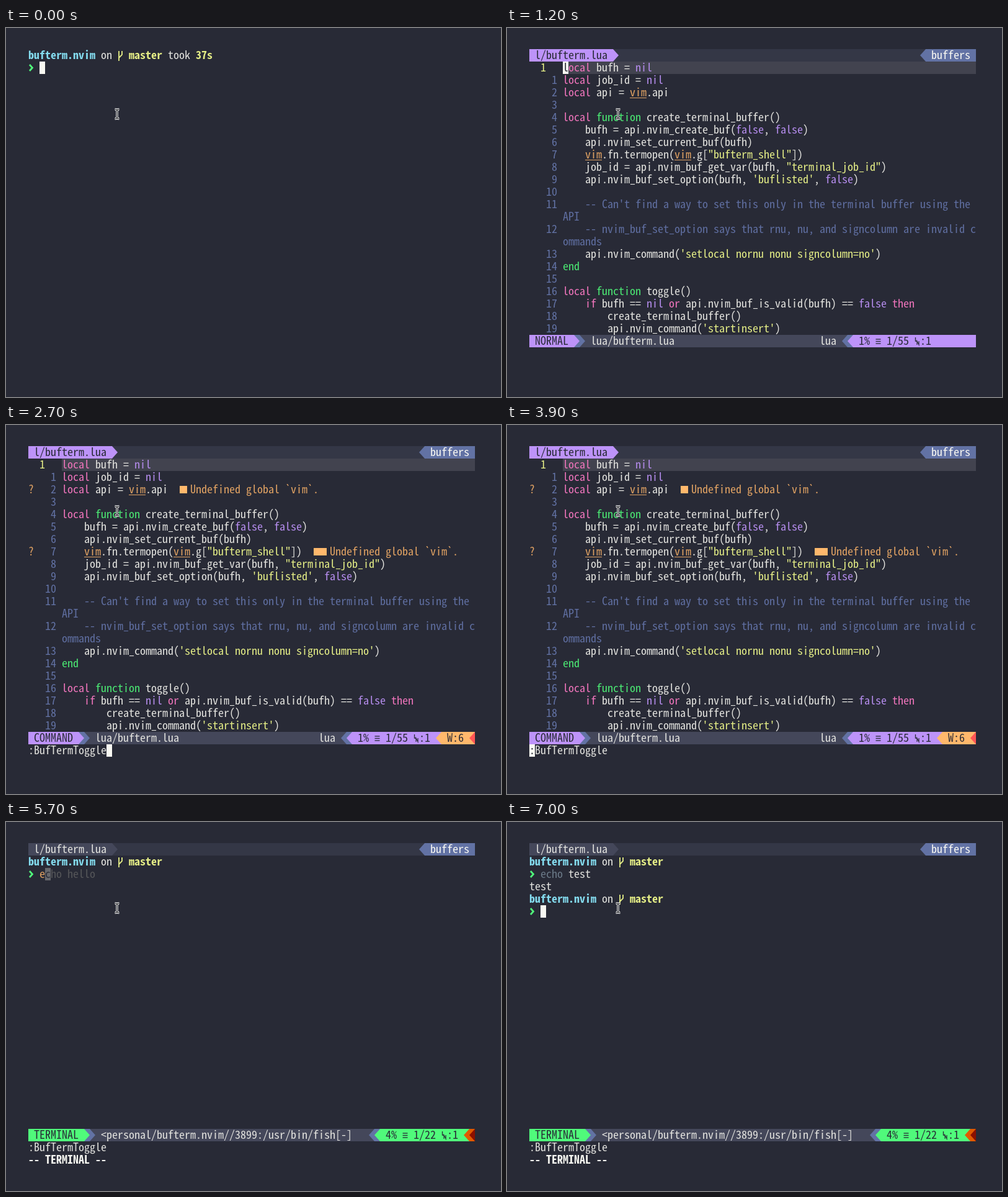
These frames come from a looping animation (798 px wide and 594 px high, 8 s). An HTML page with a canvas:

```html
<!DOCTYPE html>
<html lang="en">
<head>
<meta charset="utf-8">
<title>Terminal buffer demo</title>
<style>
  html, body { margin: 0; width: 100%; height: 100%; overflow: hidden; background: #282a36; }
  canvas { display: block; filter: blur(.45px); }
</style>
</head>
<body>
<canvas id="stage" width="798" height="594"></canvas>
<script>
const ctx = document.getElementById('stage').getContext('2d');
const LOOP = 8000, CELL_W = 9, CELL_H = 20, LEFT = 36, TOP = 34;
const FAMILY = '"Noto Sans Mono CJK JP", "Noto Sans Mono", monospace';
const C = {
  bg: '#282a36', fg: '#e2e2de', white: '#f8f8f2', bar: '#44475a', line: '#42434f', fill: '#343746',
  blue: '#6272a4', comment: '#5f6ea0', purple: '#bd93f9', violet: '#b48cec', pink: '#ee74bb',
  green: '#50fa7b', leaf: '#4be873', yellow: '#e4ed86', cyan: '#84dcef', orange: '#ffb86c',
  warn: '#e0a263', red: '#ff5555', rust: '#e05a00', maroon: '#8b1000', ghost: '#555659'
};

// Pick the font size whose advance fills one cell.
ctx.font = `18px ${FAMILY}`;
const fontSize = 18 * CELL_W / ctx.measureText('M').width;

const x = col => LEFT + col * CELL_W;
const y = row => TOP + row * CELL_H;

function put(col, row, text, color = C.fg, bold = false) {
  ctx.font = `${bold ? 'bold ' : ''}${fontSize}px ${FAMILY}`;
  ctx.fillStyle = color;
  [...text].forEach((ch, i) => ctx.fillText(ch, x(col + i), y(row) + 16));
}

function block(from, to, row, color) {
  ctx.fillStyle = color;
  ctx.fillRect(x(from), y(row), (to - from) * CELL_W, CELL_H);
}

// Powerline separator filling one cell; dir 1 points right, -1 left.
function arrow(col, row, dir, color, back) {
  block(col, col + 1, row, back);
  const base = x(dir > 0 ? col : col + 1);
  ctx.fillStyle = color;
  ctx.beginPath();
  ctx.moveTo(base, y(row));
  ctx.lineTo(base + dir * CELL_W, y(row) + CELL_H / 2);
  ctx.lineTo(base, y(row) + CELL_H);
  ctx.fill();
}

function stroke(points, color, width) {
  ctx.strokeStyle = color;
  ctx.lineWidth = width;
  ctx.beginPath();
  points.forEach(([px, py]) => ctx.lineTo(px, py));
  ctx.stroke();
}

function cursor(col, row, under = '', color = C.white) {
  block(col, col + 1, row, color);
  put(col, row, under, C.bg);
}

function pointer() {
  for (const [color, width] of [['#f4f4f4', 3.4], ['#101116', 1.2]]) {
    stroke([[179, 132], [179, 145]], color, width);
    for (const [edge, inner] of [[131, 132.5], [146, 144.5]]) {
      stroke([[175.5, edge], [177.5, edge], [179, inner], [180.5, edge], [182.5, edge]], color, width);
    }
  }
}

function prompt(row, took) {
  const px = x(16), py = y(row);
  put(0, row, 'bufterm.nvim', C.cyan, true);
  put(13, row, 'on');
  stroke([[px + 2, py + 3], [px + 2, py + 19]], C.yellow, 1.8);
  stroke([[px + 7, py + 3], [px + 7, py + 9], [px + 2, py + 14]], C.yellow, 1.8);
  put(18, row, 'master', C.yellow, true);
  if (took) {
    put(25, row, 'took');
    put(30, row, took, C.yellow, true);
  }
  const chevron = y(row + 1);
  stroke([[38, chevron + 5], [42.5, chevron + 10], [38, chevron + 15]], C.green, 2.7);
}

function typedWithGhost(row, typed, whole, color) {
  put(2, row, typed, color);
  const next = 2 + typed.length;
  put(next, row, whole.slice(typed.length), C.ghost);
  cursor(next, row, whole[typed.length], '#66676c');
}

const CODE = [
  ['', 'local bufh = nil'],
  [1, 'local job_id = nil'],
  [2, 'local api = vim.api'],
  [3, ''],
  [4, 'local function create_terminal_buffer()'],
  [5, '    bufh = api.nvim_create_buf(false, false)'],
  [6, '    api.nvim_set_current_buf(bufh)'],
  [7, '    vim.fn.termopen(vim.g["bufterm_shell"])'],
  [8, '    job_id = api.nvim_buf_get_var(bufh, "terminal_job_id")'],
  [9, "    api.nvim_buf_set_option(bufh, 'buflisted', false)"],
  [10, ''],
  [11, "    -- Can't find a way to set this only in the terminal buffer using the"],
  ['', 'API', C.comment],
  [12, '    -- nvim_buf_set_option says that rnu, nu, and signcolumn are invalid c'],
  ['', 'ommands', C.comment],
  [13, "    api.nvim_command('setlocal nornu nonu signcolumn=no')"],
  [14, 'end'],
  [15, ''],
  [16, 'local function toggle()'],
  [17, '    if bufh == nil or api.nvim_buf_is_valid(bufh) == false then'],
  [18, '        create_terminal_buffer()'],
  [19, "        api.nvim_command('startinsert')"]
];
const TOKEN = /(--.*)|("[^"]*"|'[^']*')|\b(local|if|or|then)\b|\b(function|end)\b|\b(nil|false)\b|\b(vim)\b/g;
const TOKEN_COLORS = [C.comment, C.yellow, C.pink, C.leaf, C.violet, C.warn];

function codeLine(row, text, color = C.fg) {
  let last = 0;
  for (const match of text.matchAll(TOKEN)) {
    const kind = match.slice(1).findIndex(Boolean), col = 6 + match.index;
    put(6 + last, row, text.slice(last, match.index), color);
    put(col, row, match[0], TOKEN_COLORS[kind]);
    if (kind === 5) {
      ctx.fillRect(x(col), y(row) + 18, 3 * CELL_W, 1);
    }
    last = match.index + match[0].length;
  }
  put(6 + last, row, text.slice(last), color);
}

function diagnostic(row, col, squares) {
  put(0, row, '?', C.warn);
  ctx.fillStyle = C.orange;
  ctx.fillRect(x(col) + 1, y(row) + 4, 3 + squares * CELL_W, 12);
  put(col + squares + 1, row, 'Undefined global `vim`.', C.warn);
}

function tabline(tab, text) {
  block(0, 80, 0, C.fill);
  block(0, 15, 0, tab);
  arrow(15, 0, 1, tab, C.fill);
  put(1, 0, 'l/bufterm.lua', text);
  arrow(70, 0, -1, C.blue, C.fill);
  block(71, 80, 0, C.blue);
  put(72, 0, 'buffers', C.white);
}

function linesMark(col) {
  for (const dy of [7, 10.5, 14]) {
    stroke([[x(col) + 0.5, y(23) + dy], [x(col) + 8.5, y(23) + dy]], C.bg, 1.3);
  }
}

function lineNumberMark(col) {
  const px = x(col), py = y(23);
  stroke([[px + 1.5, py + 4], [px + 1.5, py + 10], [px + 4, py + 10]], C.bg, 1.3);
  stroke([[px + 4, py + 16], [px + 4, py + 10], [px + 7, py + 16], [px + 7, py + 10]], C.bg, 1.2);
}

function statusline(mode, color, file, right, percent, position) {
  const end = mode.length + 2;
  block(0, 80, 23, C.bar);
  block(0, end, 23, color);
  put(1, 23, mode, C.bg);
  arrow(end, 23, 1, color, C.blue);
  arrow(end + 1, 23, 1, C.blue, C.bar);
  put(end + 3, 23, file);
  arrow(right, 23, -1, C.blue, C.bar);
  arrow(right + 1, 23, -1, color, C.blue);
  block(right + 2, 80, 23, color);
  put(right + 3, 23, percent, C.bg);
  linesMark(right + 6);
  put(right + 8, 23, position, C.bg);
  lineNumberMark(right + 13);
  put(right + 14, 23, ':1', C.bg);
}

function editor(mode, linted) {
  tabline(C.purple, C.bg);
  block(6, 80, 1, C.line);
  put(2, 1, '1', C.yellow);
  CODE.forEach(([number, text, color], i) => {
    put(3, i + 1, String(number).padStart(2), C.blue);
    codeLine(i + 1, text, color);
  });
  if (linted) {
    diagnostic(3, 27, 1);
    diagnostic(8, 51, 2);
  }
  statusline(mode, C.purple, 'lua/bufterm.lua', 56, '1%', '1/55');
  put(52, 23, 'lua');
  if (linted) {
    arrow(73, 23, -1, C.orange, C.purple);
    block(74, 80, 23, C.orange);
    put(75, 23, 'W:6', C.bg);
    arrow(79, 23, -1, C.red, C.orange);
  }
  if (mode === 'NORMAL') cursor(6, 1, 'l');
}

function commandMode(command, running) {
  editor('COMMAND', true);
  put(0, 24, ':' + command);
  if (running) cursor(0, 24, ':');
  else cursor(1 + command.length, 24);
}

function terminal() {
  tabline(C.bar, C.fg);
  statusline('TERMINAL', C.green, '<personal/bufterm.nvim//3899:/usr/bin/fish[-]', 61, '4%', '1/22');
  arrow(78, 23, -1, C.rust, C.green);
  arrow(79, 23, -1, C.maroon, C.rust);
  put(0, 24, ':BufTermToggle');
  put(0, 25, '-- TERMINAL --', C.white, true);
}

function shell(input) {
  terminal();
  prompt(1);
  if (input && 'echo hello'.startsWith(input)) {
    typedWithGhost(2, input, 'echo hello', input === 'echo' ? C.blue : C.warn);
  } else {
    put(2, 2, input.slice(0, 4), C.blue);
    put(6, 2, input.slice(4));
    cursor(2 + input.length, 2);
  }
}

function finished() {
  terminal();
  prompt(1);
  put(2, 2, 'echo', '#6b7a88');
  put(7, 2, 'test');
  put(0, 3, 'test');
  prompt(4);
  cursor(2, 5);
}

const SCENES = [
  [0, () => { prompt(0, '37s'); cursor(2, 1); }],
  [300, () => { prompt(0, '37s'); typedWithGhost(1, 'n', 'nvim lua/bufterm.lua', C.warn); }],
  [1100, () => cursor(0, 0)],
  [1200, () => editor('NORMAL', false)],
  [1300, () => editor('NORMAL', true)],
  [1900, () => commandMode('')],
  [2200, () => commandMode('B')],
  [2400, () => commandMode('BufTermCreateNewBuffer')],
  [2700, () => commandMode('BufTermToggle')],
  [3900, () => commandMode('BufTermToggle', true)],
  [4000, () => { terminal(); cursor(0, 1); }],
  [4200, () => shell('')],
  [5700, () => shell('e')],
  [5800, () => shell('ec')],
  [5900, () => shell('echo')],
  [6600, () => shell('echo t')],
  [6700, () => shell('echo tes')],
  [6800, () => shell('echo test')],
  [7000, finished]
];

const start = performance.now();
function frame() {
  const time = (performance.now() - start) % LOOP;
  ctx.fillStyle = C.bg;
  ctx.fillRect(0, 0, 798, 594);
  SCENES.findLast(([from]) => from <= time)[1]();
  pointer();
  requestAnimationFrame(frame);
}
frame();
</script>
</body>
</html>
```
